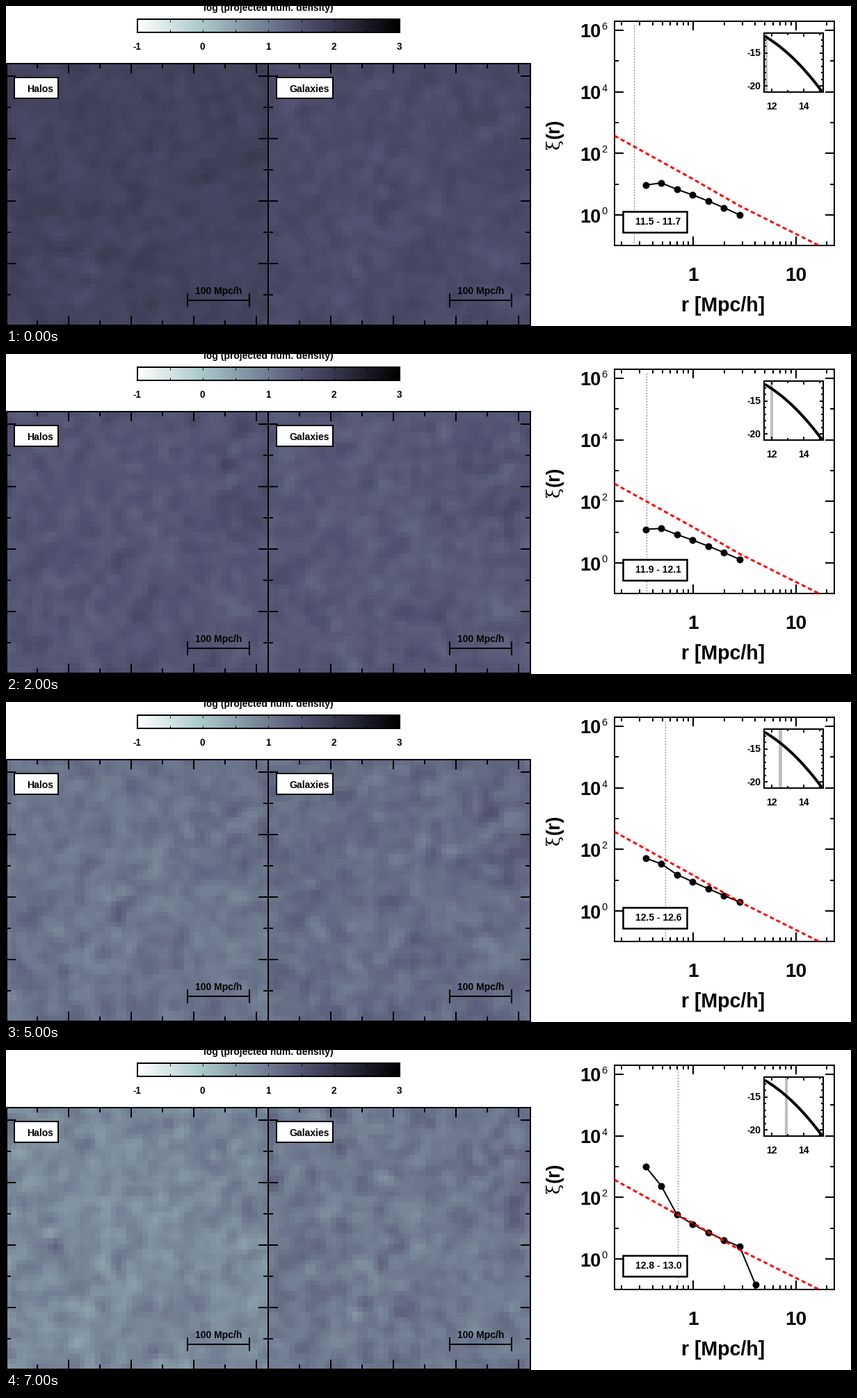
Recreate the animation shown at these times as a matplotlib script. Size 1215 px wide and 461 px high, loop 8000 ms.

```python
import numpy as np
import matplotlib.pyplot as plt
from matplotlib.animation import FuncAnimation
from matplotlib.patches import Rectangle

W, H, DPI = 1215, 461, 64
PX = 72 / DPI          # points per pixel
STEPS = 8
CELLS = 50
SIDE, TOP = 377, 83    # width and upper edge of a density map

plt.rcParams["font.family"] = "Liberation Sans"
fig = plt.figure(figsize=(W / DPI, H / DPI), dpi=DPI, facecolor="white")
ax = fig.add_axes([0, 0, 1, 1])


def line(xs, ys, color="black", w=2, z=3, **kw):
    kw.setdefault("solid_capstyle", "butt")
    return ax.plot(xs, ys, color=color, lw=w * PX, zorder=z, **kw)[0]


def box(x0, y0, x1, y1, fill="none", w=2, z=4):
    return ax.add_patch(Rectangle((x0, y0), x1 - x0, y1 - y0, fc=fill, ec="black",
                                  lw=w * PX, zorder=z, joinstyle="miter"))


def label(x, y, s, size=14, ha="center", va="baseline", weight="bold", **kw):
    return ax.text(x, y, s, size=size * PX, ha=ha, va=va,
                   weight=weight, zorder=7, **kw)


def ticks_x(xs, y0, y1, size, w=2):
    for x in xs:
        line([x, x], [y0, y0 + size], w=w)
        line([x, x], [y1, y1 - size], w=w)


def ticks_y(ys, x0, x1, size, w=2):
    for y in ys:
        line([x0, x0 + size], [y, y], w=w)
        line([x1, x1 - size], [y, y], w=w)


# ---- density maps ----
rng = np.random.default_rng(12)


def smooth_noise(sigma):
    f = np.fft.fftfreq(CELLS)
    kernel = np.exp(-2 * (np.pi * sigma) ** 2 * (f[:, None] ** 2 + f ** 2))
    field = np.fft.ifft2(np.fft.fft2(rng.normal(size=(CELLS, CELLS))) * kernel).real
    return field / field.std()


# x, y, strength, radius of the most visible clumps and voids
CLUMPS = [
    (150, 265, 1.4, 12), (123, 380, 1.4, 12), (148, 325, 1.2, 13),
    (305, 330, 1.2, 42), (225, 195, 0.9, 22),
    (345, 235, -1.4, 22), (325, 160, -1.0, 20), (90, 270, -1.0, 20),
]
centre = (np.arange(CELLS) + 0.5) * SIDE / CELLS
gx, gy = np.meshgrid(centre, centre + TOP)
clumps = sum(a * np.exp(-((gx - x) ** 2 + (gy - y) ** 2) / (2 * r * r))
             for x, y, a, r in CLUMPS)
shared = 1.1 * clumps + 0.7 * smooth_noise(0.9)


def make_maps(start, rise, slowing):
    fields = [smooth_noise(0.9) for _ in range(STEPS + 1)]
    return [start + rise * k - slowing * k * k
            + (0.014 + 0.002 * k) * (shared + 0.45 * (fields[k] + fields[k + 1]))
            for k in range(STEPS)]


halo_maps = make_maps(0.300, 0.038, 0.0005)
galaxy_maps = make_maps(0.337, 0.0265, 0.0007)


def show_map(x0, data):
    return ax.imshow(data, cmap="bone", vmin=0, vmax=1, aspect="auto",
                     extent=(x0, x0 + SIDE, TOP + SIDE, TOP),
                     interpolation="nearest", zorder=1)


halo_img = show_map(0, halo_maps[0])
galaxy_img = show_map(SIDE, galaxy_maps[0])

for x0, name, right in [(0, "Halos", 75), (SIDE, "Galaxies", 470)]:
    x1, y1 = x0 + SIDE, TOP + SIDE
    steps = 90 * np.arange(4)
    box(max(x0, 1), TOP, x1, y1)
    ticks_x(x0 + 90 + steps, TOP, y1, 14)
    ticks_x(x0 + 45 + steps, TOP, y1, 7)
    ticks_y(101 + steps, x0, x1, 14)
    ticks_y(146 + steps, x0, x1, 7)
    box(x0 + 12, 103, right, 133, "white", z=5)
    label(x0 + 30, 123.5, name, ha="left")
    a, b = x0 + 261, x0 + 350
    line([a, b], [424, 424])
    for x in (a, b):
        line([x, x], [414, 434])
    label(x0 + 305.5, 415.5, "100 Mpc/h")

# ---- colour bar ----
ax.imshow(np.linspace(1, 0, 256)[None], cmap="bone", vmin=0, vmax=1,
          aspect="auto", extent=(189, 566, 38, 19), zorder=1)
box(189, 19, 566, 38)
ticks_x(189 + 47.1 * np.arange(1, 8), 20, 37, 3, w=1)
for i in range(5):
    label(188 + 94.3 * i, 63, str(i - 1), 13.5)
label(377, 7, "log (projected num. density)", 13.9)

# ---- correlation plot ----
L, R, T, B = 875, 1191, 22, 345


def px_x(v):
    return 988.2 + 147.5 * np.log10(v)


def px_y(exp):
    return 301 - 44.35 * exp


box(L, T, R, B)
ticks_x(px_x(np.array([1, 10])), T, B, 13)
minor = np.r_[np.arange(2, 10) / 10, np.arange(2, 10), 20]
ticks_x(px_x(minor), T, B, 6)
ticks_y(px_y(np.arange(0, 7, 2)), L, R, 13)
ticks_y(px_y(np.arange(1, 6, 2)), L, R, 6)
for e in range(0, 7, 2):
    label(855.5, px_y(e) + 10.5, "10", 27, ha="right")
    label(860.5, px_y(e) - 1, str(e), 14.5, weight="normal")
for v in (1, 10):
    label(px_x(v), 396, str(v), 28)
label(1031.5, 440, "r [Mpc/h]", 28.5)
label(788.5, 177, "(r)", 27, va="center", rotation=90)
label(788.5, 199, "ξ", 26, va="center", rotation=90, weight="normal",
      family="DejaVu Serif")

line([L, 988, 1055, 1168], [187, 249.5, 288, 344.5], color="red", w=3, z=5,
     dashes=(2, 1.4), dash_capstyle="butt")


def log_xi(k):
    """Inner points grow exponentially, the outer ones drift up slowly."""
    grow = 1.6 ** k - 1
    inner = [0.97 + 0.0785 * grow, 1.04 + 0.0515 * grow]
    u = np.linspace(0, 1, 5)
    near, far = 0.83 + 0.03 * k + 0.008 * k * k, 0.057 * k
    bend = 0.035 - 0.0019 * k * k
    outer = near + (far - near) * u + bend * 4 * u * (1 - u)
    tail = [-0.83] if k == STEPS - 1 else []
    return np.r_[inner, outer, tail]


curve = line([], [], z=4, marker="o", ms=10 * PX, mew=0)
marker = line([], [], w=1, z=2, dashes=(1, 3), dash_capstyle="butt")
box(887, 295.5, 979, 325.5, "white", w=2.5, z=6)
range_text = label(905, 315, "", 13.9, ha="left")

# ---- inset ----
IL, IR, IT, IB = 1090, 1175, 39, 124
band = ax.add_patch(Rectangle((IL, IT), 4.3, IB - IT, fc="#bebebe", lw=0, zorder=2))
box(IL, IT, IR, IB)
ticks_x([1101, 1147], IT, IB, 5)
ticks_x([1124, 1170], IT, IB, 3)
ticks_y([67.5, 115], IL, IR, 5)
ticks_y(48.5 + 9.5 * np.arange(7), IL, IR, 3)
u = np.linspace(1, 83, 40)
line(IL + u, 43 + u * (0.58 + 0.0046 * u), w=4)
for y, s in [(72.5, "-15"), (120, "-20")]:
    label(1086, y, s, ha="right")
for x, s in [(1101, "12"), (1147, "14")]:
    label(x, 149, s)

ax.set_xlim(0, W)
ax.set_ylim(H, 0)
ax.axis("off")


def update(k):
    halo_img.set_data(halo_maps[k])
    galaxy_img.set_data(galaxy_maps[k])
    exps = log_xi(k)
    curve.set_data(919.7 + 22.55 * np.arange(len(exps)), px_y(exps))
    x = 902.5 + 9.1 * k
    marker.set_data([x, x], [B, 26])
    low = 11.53 + 0.185 * k
    range_text.set_text(f"{low:.1f} - {low + 0.185:.1f}")
    band.set_x(1090.4 + 4.2 * k)
    return halo_img, galaxy_img, curve, marker, range_text, band


anim = FuncAnimation(fig, update, frames=STEPS, init_func=lambda: update(0),
                     interval=1000, repeat=True, repeat_delay=0)
plt.show()
```
